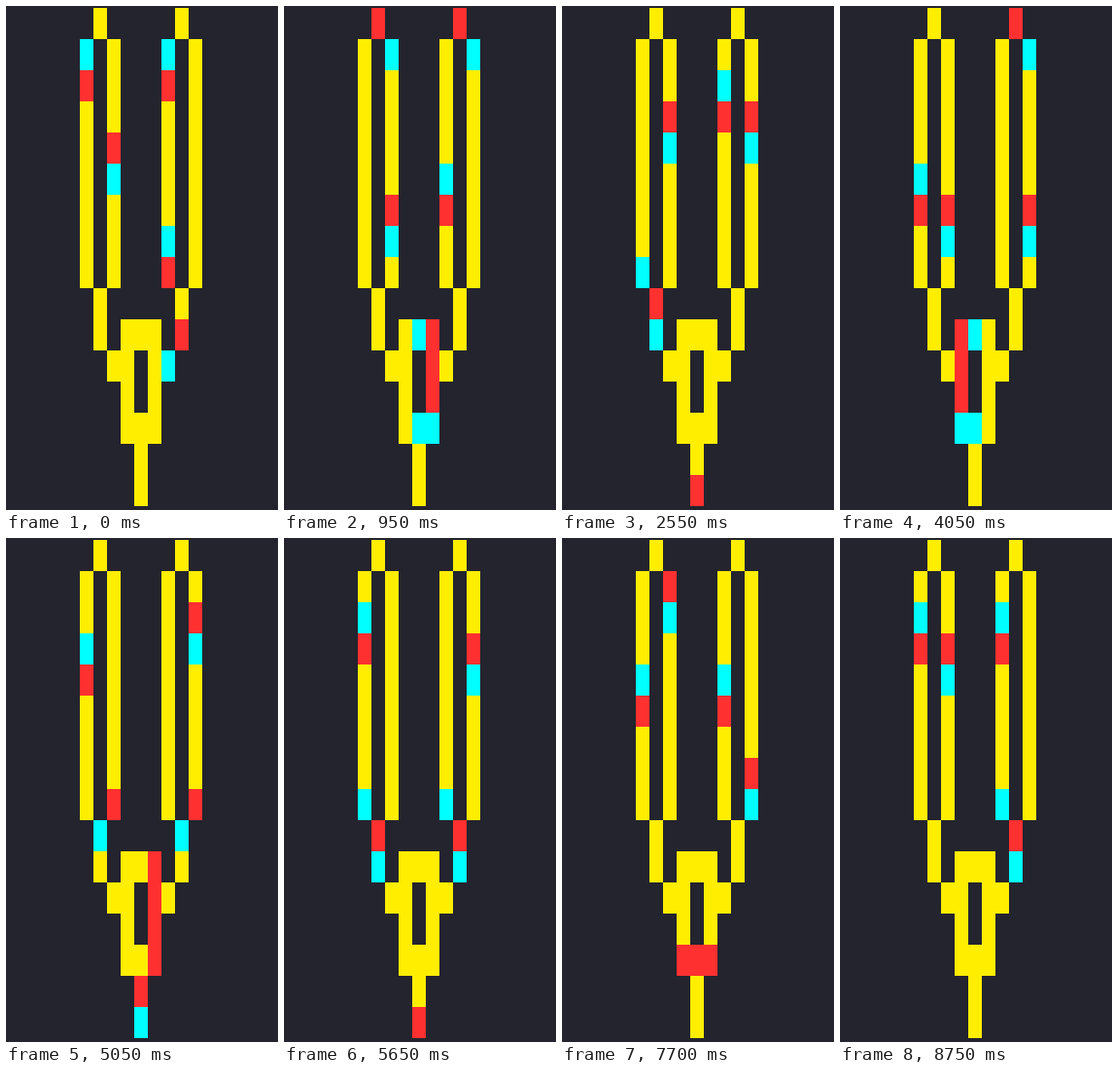
Write an HTML page with a canvas that moves like this. It is 280 px wide and 518 px high and loops after 9200 ms.

```html
<!DOCTYPE html>
<html lang="en">
<head>
<meta charset="utf-8">
<title>Wireworld XOR gate</title>
<style>
  html, body { margin: 0; width: 100%; height: 100%; overflow: hidden; background: #24242e; }
  canvas { display: block; }
</style>
</head>
<body>
<canvas width="280" height="518"></canvas>
<script>
// Wireworld: # wire, H electron head, t electron tail
const START = [
  '......#.....#.......',
  '.....H.#...H.#......',
  '.....t.#...t.#......',
  '.....#.#...#.#......',
  '.....#.t...#.#......',
  '.....#.H...#.#......',
  '.....#.#...#.#......',
  '.....#.#...H.#......',
  '.....#.#...t.#......',
  '......#.....#.......',
  '......#.###.t.......',
  '.......##.#H........',
  '........#.#.........',
  '........###.........',
  '.........#..........',
  '.........#..........'
];
const COLORS = { '#': '#ffee00', H: '#00ffff', t: '#ff3030' };
const CELL_W = 14, CELL_H = 32, LEFT = 6, TOP = 2;
const LOOP = 9200;
const TIMES = [0, 400, 950, 1450, 1950, 2550, 3050, 3550, 4050,
               4600, 5050, 5650, 6100, 6650, 7200, 7700, 8250, 8750];

function countHeads(grid, x, y) {
  let n = 0;
  for (let j = y - 1; j <= y + 1; j++)
    for (let i = x - 1; i <= x + 1; i++)
      if (grid[j] && grid[j][i] === 'H') n++;
  return n;
}

function nextCell(grid, cell, x, y) {
  if (cell === 'H') return 't';
  if (cell === 't') return '#';
  if (cell === '#') {
    const n = countHeads(grid, x, y);
    return n === 1 || n === 2 ? 'H' : '#';
  }
  return cell;
}

const step = grid => grid.map((row, y) =>
  [...row].map((cell, x) => nextCell(grid, cell, x, y)).join(''));

const states = [START];
while (states.length < TIMES.length) states.push(step(states[states.length - 1]));

const ctx = document.querySelector('canvas').getContext('2d');

function draw(grid) {
  ctx.fillStyle = '#24242e';
  ctx.fillRect(0, 0, 280, 518);
  grid.forEach((row, y) => [...row].forEach((cell, x) => {
    if (cell === '.') return;
    ctx.fillStyle = COLORS[cell];
    ctx.fillRect(LEFT + x * CELL_W, TOP + y * CELL_H, CELL_W, CELL_H);
  }));
}

const origin = performance.now();
let shown = -1;

function tick() {
  const t = (performance.now() - origin) % LOOP;
  let i = TIMES.length - 1;
  while (TIMES[i] > t) i--;
  if (i !== shown) draw(states[shown = i]);
  requestAnimationFrame(tick);
}
tick();
</script>
</body>
</html>
```
